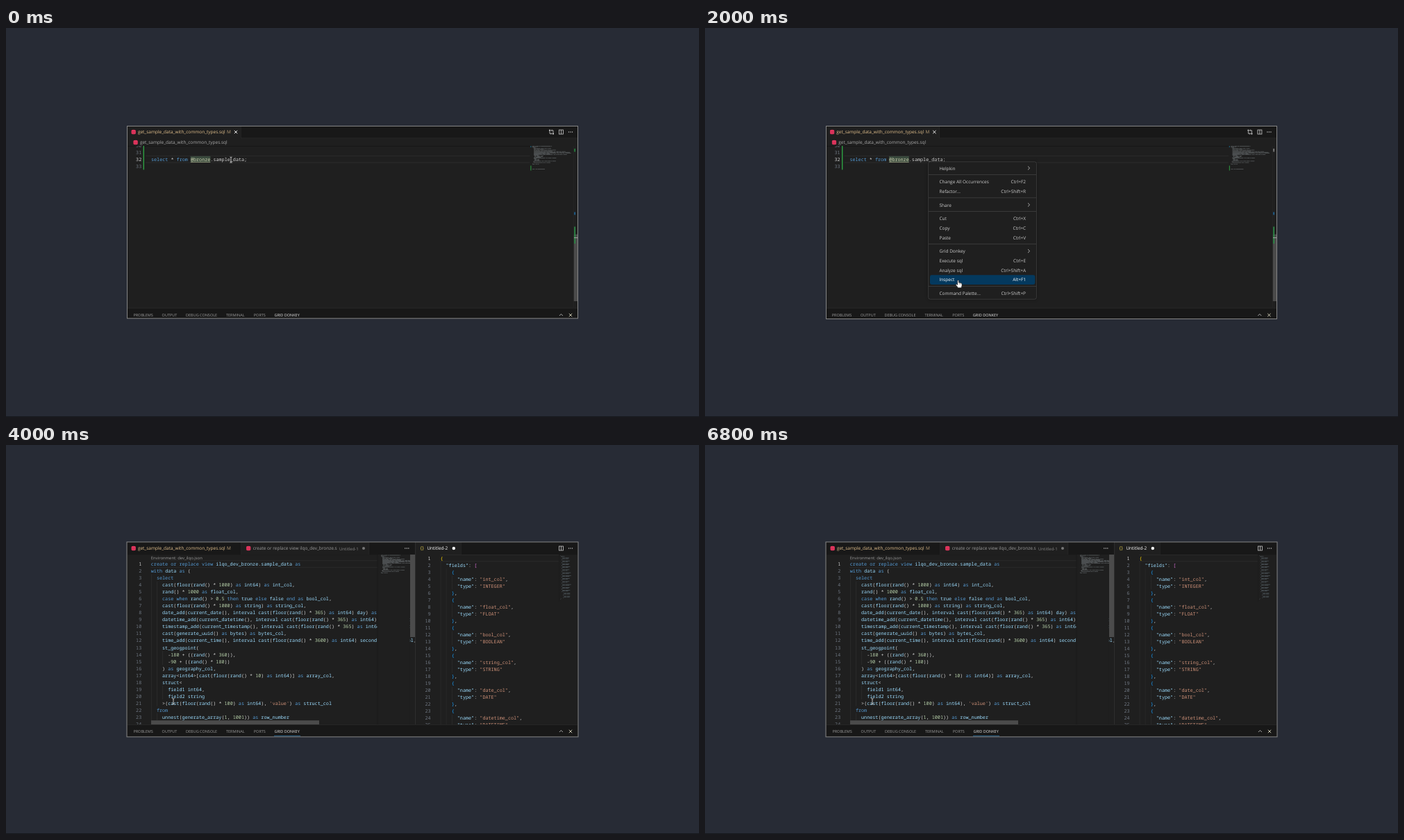
Recreate the animation shown at these times as an HTML page with a canvas. Size 998 by 561 pixels, loop 8000 ms.

```html
<!DOCTYPE html>
<html lang="en">
<head>
<meta charset="utf-8">
<title>Inspect a view</title>
<style>
html, body { margin: 0; width: 100%; height: 100%; overflow: hidden; background: #272b35; }
canvas { display: block; width: 998px; height: 561px; }
</style>
</head>
<body>
<canvas id="stage"></canvas>
<script>
const W = 998, H = 561, LOOP = 8000;
const ADV = 4.066, ROW = 10.04;
const UI = '"Open Sans", "Noto Sans", sans-serif';
const MONO = '"Noto Sans Mono", "DejaVu Sans Mono", monospace';
const C = {
  bg: '#272b35', editor: '#1f1f1f', bar: '#181818', line: '#2b2b2b', frame: '#858585',
  text: '#cccccc', dim: '#9d9d9d', num: '#6e7681', key: '#569cd6', id: '#9cdcfe',
  str: '#ce9178', lit: '#b5cea8', gold: '#e2c08d', red: '#e8365f', green: '#2ea043',
  thumb: '#4b4b4b', blue: '#1b81a8'
};

const canvas = document.getElementById('stage');
const g = canvas.getContext('2d');
const dpr = window.devicePixelRatio || 1;
canvas.width = W * dpr;
canvas.height = H * dpr;

const SQL = `create or replace view ilqo_dev_bronze.sample_data as
with data as (
  select
    cast(floor(rand() * 1000) as int64) as int_col,
    rand() * 1000 as float_col,
    case when rand() > 0.5 then true else false end as bool_col,
    cast(floor(rand() * 1000) as string) as string_col,
    date_add(current_date(), interval cast(floor(rand() * 365) as int64) day) as date_col,
    datetime_add(current_datetime(), interval cast(floor(rand() * 365) as int64) day) as datetime_col,
    timestamp_add(current_timestamp(), interval cast(floor(rand() * 365) as int64) day) as timestamp_col,
    cast(generate_uuid() as bytes) as bytes_col,
    time_add(current_time(), interval cast(floor(rand() * 3600) as int64) second) as time_col,
    st_geogpoint(
      -180 + ((rand() * 360)),
      -90 + ((rand() * 180))
    ) as geography_col,
    array<int64>[cast(floor(rand() * 10) as int64)] as array_col,
    struct<
      field1 int64,
      field2 string
    >(cast(floor(rand() * 100) as int64), 'value') as struct_col
  from
    unnest(generate_array(1, 1001)) as row_number
)
select * from data`.split('\n');

const TEMPLATE = SQL.slice();
TEMPLATE[31] = 'select * from @bronze.sample_data;';

const item = (name, type, pad = '    ') => [
  pad + '{', `${pad}  "name": "${name}",`, `${pad}  "type": "${type}"`, pad + '},'
];
const kinds = ['int INTEGER', 'float FLOAT', 'bool BOOLEAN', 'string STRING', 'date DATE',
  'datetime DATETIME', 'timestamp TIMESTAMP', 'bytes BYTES', 'time TIME',
  'geography GEOGRAPHY', 'array INTEGER', 'struct RECORD'];
const JSON_ROWS = ['{', '  "fields": ['].concat(
  kinds.flatMap(k => { const [n, t] = k.split(' '); return item(n + '_col', t); }),
  item('field1', 'INTEGER', '        '), item('field2', 'STRING', '        '), ['  ]', '}']);

const KEYS = new Set('create or replace view with as select from case when then else end'.split(' '));

function box(x, y, w, h, color) {
  g.fillStyle = color;
  g.fillRect(x, y, w, h);
}

function round(x, y, w, h, r, color) {
  g.fillStyle = color;
  g.beginPath();
  g.roundRect(x, y, w, h, r);
  g.fill();
}

function path(points, color, width = 0.8) {
  g.strokeStyle = color;
  g.lineWidth = width;
  g.beginPath();
  points.forEach(([x, y], i) => i ? g.lineTo(x, y) : g.moveTo(x, y));
  g.stroke();
}

function dot(x, y, r, color) {
  g.fillStyle = color;
  g.beginPath();
  g.arc(x, y, r, 0, 7);
  g.fill();
}

function clip(x, y, w, h, draw) {
  g.save();
  g.beginPath();
  g.rect(x, y, w, h);
  g.clip();
  draw();
  g.restore();
}

// y is the middle of the text line
function text(s, x, y, color = C.text, size = 6.48, align = 'left', font = UI) {
  g.font = size + 'px ' + font;
  g.textAlign = align;
  g.fillStyle = color;
  g.fillText(s, x, y + size * 0.36);
}

const mono = (s, x, y, color, align) => text(s, x, y, color, ADV / 0.6, align, MONO);

function code(row, x, y, paint) {
  const re = /"[^"]*"|'[^']*'|[A-Za-z_]\w*|\d[\d.]*|[^\sA-Za-z_\d"']/g;
  for (const m of row.matchAll(re)) mono(m[0], x + m.index * ADV, y, paint(m[0], row, m.index));
}

function sqlColor(t) {
  if (KEYS.has(t)) return C.key;
  if (t[0] === "'") return C.str;
  if (/^\d/.test(t)) return C.lit;
  return /^\w/.test(t) ? C.id : '#d4d4d4';
}

function jsonColor(t, row, at) {
  if (t[0] === '"') return row[at + t.length] === ':' ? C.id : C.str;
  if (t === '[') return '#da70d6';
  if (/[{}]/.test(t)) return at ? '#179fff' : '#ffd700';
  return C.text;
}

function minimap(rows, x, y, color, step = 1.062) {
  rows.forEach((row, i) => {
    for (const m of row.matchAll(/\S+/g))
      box(x + m.index * 0.53, y + i * step, m[0].length * 0.53, 0.62, color);
  });
}

function database(x, y) {
  g.fillStyle = C.red;
  for (let i = -1; i < 2; i++) {
    g.beginPath();
    g.ellipse(x, y + i * 1.9, 3.1, 1.25, 0, 0, 7);
    g.fill();
  }
  box(x - 3.1, y - 2, 6.2, 4, C.red);
  path([[x - 3, y - 0.9], [x, y - 0.3], [x + 3, y - 0.9]], '#8c2740', 0.35);
  path([[x - 3, y + 1.2], [x, y + 1.8], [x + 3, y + 1.2]], '#8c2740', 0.35);
}

function cross(x, y, color) {
  path([[x - 2.2, y - 2.2], [x + 2.2, y + 2.2]], color, 0.9);
  path([[x + 2.2, y - 2.2], [x - 2.2, y + 2.2]], color, 0.9);
}

function dots(x, y) {
  for (let i = -1; i < 2; i++) dot(x + i * 2.5, y, 0.7, C.text);
}

function split(x, y) {
  g.strokeStyle = C.text;
  g.lineWidth = 0.8;
  g.strokeRect(x - 3, y - 3, 6, 6);
  path([[x, y - 3], [x, y + 3]], C.text);
}

function compare(x, y) {
  path([[x - 2.5, y - 2], [x - 2.5, y + 2.3], [x + 0.5, y + 2.3]], C.text);
  path([[x - 0.7, y + 1], [x + 0.6, y + 2.3], [x - 0.7, y + 3.6]], C.text, 0.6);
  path([[x + 2.5, y + 2], [x + 2.5, y - 2.3], [x - 0.5, y - 2.3]], C.text);
  path([[x + 0.7, y - 3.6], [x - 0.6, y - 2.3], [x + 0.7, y - 1]], C.text, 0.6);
  dot(x - 2.5, y - 2.5, 1.1, C.text);
  dot(x + 2.5, y + 2.6, 1.1, C.text);
}

function beam(x, y) {
  path([[x - 1.6, y - 4.2], [x, y - 3.7], [x + 1.6, y - 4.2]], '#eeeeee', 0.7);
  path([[x, y - 3.7], [x, y + 3.7]], '#eeeeee', 0.8);
  path([[x - 1.6, y + 4.2], [x, y + 3.7], [x + 1.6, y + 4.2]], '#eeeeee', 0.7);
}

function hand(x, y) {
  const p = new Path2D('M-1.8 -5.2q.9-.9 1.7 0v3q3 .3 4.6 1.4q.5 3-1 6.2h-4.8q-.8-2-2.9-4q-.2-1.4 1-1.2l1.4 1z');
  g.save();
  g.translate(x, y);
  g.fillStyle = '#ffffff';
  g.fill(p);
  g.strokeStyle = '#111111';
  g.lineWidth = 0.6;
  g.stroke(p);
  path([[0.8, -1.6], [0.8, 0.6]], '#333333', 0.4);
  path([[2.4, -1.3], [2.4, 0.7]], '#333333', 0.4);
  g.restore();
}

function border(x, y, w, h) {
  g.strokeStyle = C.frame;
  g.lineWidth = 1;
  g.strokeRect(x, y, w, h);
}

function panel(y, open) {
  const labels = [['PROBLEMS', 183.4], ['OUTPUT', 224.6], ['DEBUG CONSOLE', 259],
    ['TERMINAL', 317], ['PORTS', 356.8], ['GRID DONKEY', 386.4]];
  labels.forEach(([s, x], i) => text(s, x, y, i === 5 ? '#e7e7e7' : C.dim, 5.5));
  if (open) box(386, y + 6, 38, 0.7, '#2f7fb8');
  path([[796.9, y + 1], [799.4, y - 1.5], [801.9, y + 1]], C.text);
  cross(813, y, '#d8d5bd');
}

function fileTab(y) {
  database(183.7, y);
  text('get_sample_data_with_common_types.sql', 189.9, y, C.gold);
  text('M', 318, y, '#b89d76');
}

function editor(shift, fresh) {
  box(174, 141, 650, 278, C.editor);
  box(338, 142, 485, 17, C.bar);
  box(338, 158.5, 485, 0.6, C.line);
  box(175, 404, 648, 15, C.bar);
  box(175, 403.7, 648, 0.7, C.line);
  g.save();
  g.translate(shift, 0);
  fileTab(150);
  cross(331, 150, '#ffffff');
  box(338, 142, 0.6, 17, C.line);
  compare(785.5, 150);
  split(799.5, 150);
  dots(813, 150);
  database(186.6, 165);
  text('get_sample_data_with_common_types.sql', 192.9, 165, '#a9a9a9');

  clip(175, 170, 648, 233, () => {
    box(175, 170, 580, 0.8, '#161616');
    for (let n = 30; n < 34; n++)
      mono(n, 195.2, 189.5 + (n - 32) * ROW, n === 32 ? C.text : C.num, 'right');
    box(197.6, 170, 1.4, 34.4, C.green);
    box(201, 184.3, 553.5, 0.7, '#303030');
    box(201, 193.7, 553.5, 0.7, '#303030');
    box(265.6, 184.9, 28.8, 8.8, '#3a4a3d');
    code('select * from', 209, 189.5, sqlColor);
    mono('@bronze', 209 + 14 * ADV, 189.5, '#d3d7b4');
    box(265.8, 193, 28.4, 0.6, '#b9bd98');
    mono('.sample_data;', 209 + 21 * ADV, 189.5, '#d4d4d4');
    minimap(TEMPLATE, 758, 170.4, 'rgba(175,185,190,0.5)');
    box(755.4, 170.4, 1, 1.5, C.blue);
    box(755.4, 198.5, 1, 7, C.green);
  });
  g.restore();

  box(817.2, 170, 0.5, 233, '#2a2a2a');
  box(817.8, 297.5, 5.2, 96.5, C.thumb);
  box(818.2, 174, 1.9, 4.5, fresh ? '#23793a' : '#777777');
  box(818.2, 265.5, 1.9, 4, '#1d5c8a');
  box(818.2, 286.5, 1.9, 24.5, '#2b8244');
  box(818, 302, 5, 1, '#a0a0a0');
  g.save();
  g.translate(shift, 0);
  panel(414, false);
  g.restore();
  border(174.5, 141.5, 649, shift ? 278 : 277.3);
}

const MENU = [
  [202.2, 'Helpkin', '>'], [211.5],
  [222.1, 'Change All Occurrences', 'Ctrl+F2'], [235.9, 'Refactor...', 'Ctrl+Shift+R'], [244.8],
  [255.2, 'Share', '>'], [264.6],
  [275, 'Cut', 'Ctrl+X'], [288.7, 'Copy', 'Ctrl+C'], [302.4, 'Paste', 'Ctrl+V'], [311.6],
  [321.9, 'Grid Donkey', '>'], [335.8, 'Execute sql', 'Ctrl+E'],
  [349.4, 'Analyze sql', 'Ctrl+Shift+A'], [363.1, 'Inspect', 'Alt+F1'], [372.4],
  [382.6, 'Command Palette...', 'Ctrl+Shift+P']
];

function menu() {
  g.save();
  g.shadowColor = 'rgba(0,0,0,0.4)';
  g.shadowBlur = 4;
  round(321.5, 192.7, 156, 198.6, 2.8, C.editor);
  g.restore();
  g.strokeStyle = '#454545';
  g.lineWidth = 0.7;
  g.beginPath();
  g.roundRect(321.6, 192.8, 155.8, 198.4, 2.8);
  g.stroke();
  round(324, 356.3, 151.3, 13.6, 2.4, '#04395e');
  for (const [y, label, hint] of MENU) {
    if (!label) { box(322, y - 0.3, 155, 0.7, '#454545'); continue; }
    const color = label === 'Inspect' ? '#ffffff' : C.text;
    text(label, 337.5, y, color);
    if (hint === '>') path([[465, y - 2.7], [467.6, y - 0.2], [465, y + 2.3]], C.text);
    else text(hint, 462, y, color, 6.48, 'right');
  }
  hand(365.5, 369.3);
}

function results() {
  box(174, 140, 650, 281, C.editor);
  box(338, 140, 251, 18.2, C.bar);
  box(655, 140, 168, 18.2, C.bar);
  box(339, 140, 184, 18.2, C.editor);
  for (const x of [338, 522.6, 655]) box(x, 140, 0.6, 18, C.line);
  box(175, 140, 163, 18.2, C.bar);

  fileTab(149);
  database(349.2, 149);
  text('create or replace view ilqo_dev_bronze.s', 355.7, 149, C.dim);
  text('Untitled-1', 480, 149.4, '#858585', 6);
  dot(515, 149, 2, '#777777');
  dots(577.3, 149);
  text('{}', 596.6, 148.6, '#d7c34a', 7);
  text('Untitled-2', 606.4, 149, '#ffffff');
  dot(644.8, 149, 2.2, '#ffffff');
  split(799.5, 149);
  dots(813, 149);

  clip(175, 158, 414, 245, () => {
    text('Environment: ilqo'.replace('ilqo', 'dev_ilqo.json'), 208.8, 162.4, '#999999', 5.9);
    box(208, 166.5, 327, 0.6, '#303030');
    box(208, 176.2, 327, 0.6, '#303030');
    box(209.2, 186.5, 0.5, 211, '#343434');
    box(217.2, 196.6, 0.5, 180, '#343434');
    box(217.2, 387, 0.5, 10, '#343434');
    box(225.4, 297, 0.5, 20, '#343434');
    box(225.4, 347, 0.5, 20, '#343434');
    SQL.slice(0, 24).forEach((row, i) => {
      const y = 171.6 + i * ROW;
      mono(i + 1, 195.2, y, i ? C.num : C.text, 'right');
      code(row, 208.8, y, sqlColor);
    });
    box(535, 158, 46.8, 245, C.editor);
    box(534.6, 158, 0.8, 245, '#191919');
    clip(535, 158, 47, 240, () => minimap(SQL, 540, 158.7, 'rgba(175,185,190,0.5)'));
    box(582, 158, 7, 119, C.thumb);
    box(209, 397.2, 242, 6, C.thumb);
  });

  clip(590, 158, 233, 245, () => {
    box(625, 158.3, 171, 0.6, '#303030');
    box(625, 167.6, 171, 0.6, '#303030');
    box(625.8, 168, 0.5, 235, '#343434');
    box(633.8, 178, 0.5, 225, '#343434');
    JSON_ROWS.slice(0, 25).forEach((row, i) => {
      const y = 163.1 + i * ROW;
      mono(i + 1, 611.5, y, i ? C.num : C.text, 'right');
      if (row.startsWith('      ')) box(642, y - 5, 0.5, ROW, '#343434');
      code(row, 625.4, y, jsonColor);
    });
    minimap(JSON_ROWS, 798, 159.4, 'rgba(140,160,172,0.5)');
    box(796.4, 158, 0.6, 68, '#191919');
  });

  box(589.3, 140, 0.8, 263, '#343434');
  box(175, 403, 648, 17.5, C.bar);
  box(175, 403, 648, 0.7, C.line);
  panel(413, true);
  beam(241, 369.8);
  border(174, 139.9, 650, 281);
}

function draw(t) {
  g.setTransform(dpr, 0, 0, dpr, 0, 0);
  g.textBaseline = 'alphabetic';
  g.textRendering = 'geometricPrecision';
  box(0, 0, W, H, C.bg);
  box(0, 560, W, 1, '#16181d');
  if (t < 2000) {
    editor(0, true);
    beam(324, 190.2);
  } else if (t < 4000) {
    editor(-0.6, t >= 3000);
    menu();
  } else {
    results();
  }
}

const start = performance.now();
function tick() {
  draw((performance.now() - start) % LOOP);
  requestAnimationFrame(tick);
}
draw(0);
requestAnimationFrame(tick);
</script>
</body>
</html>
```
